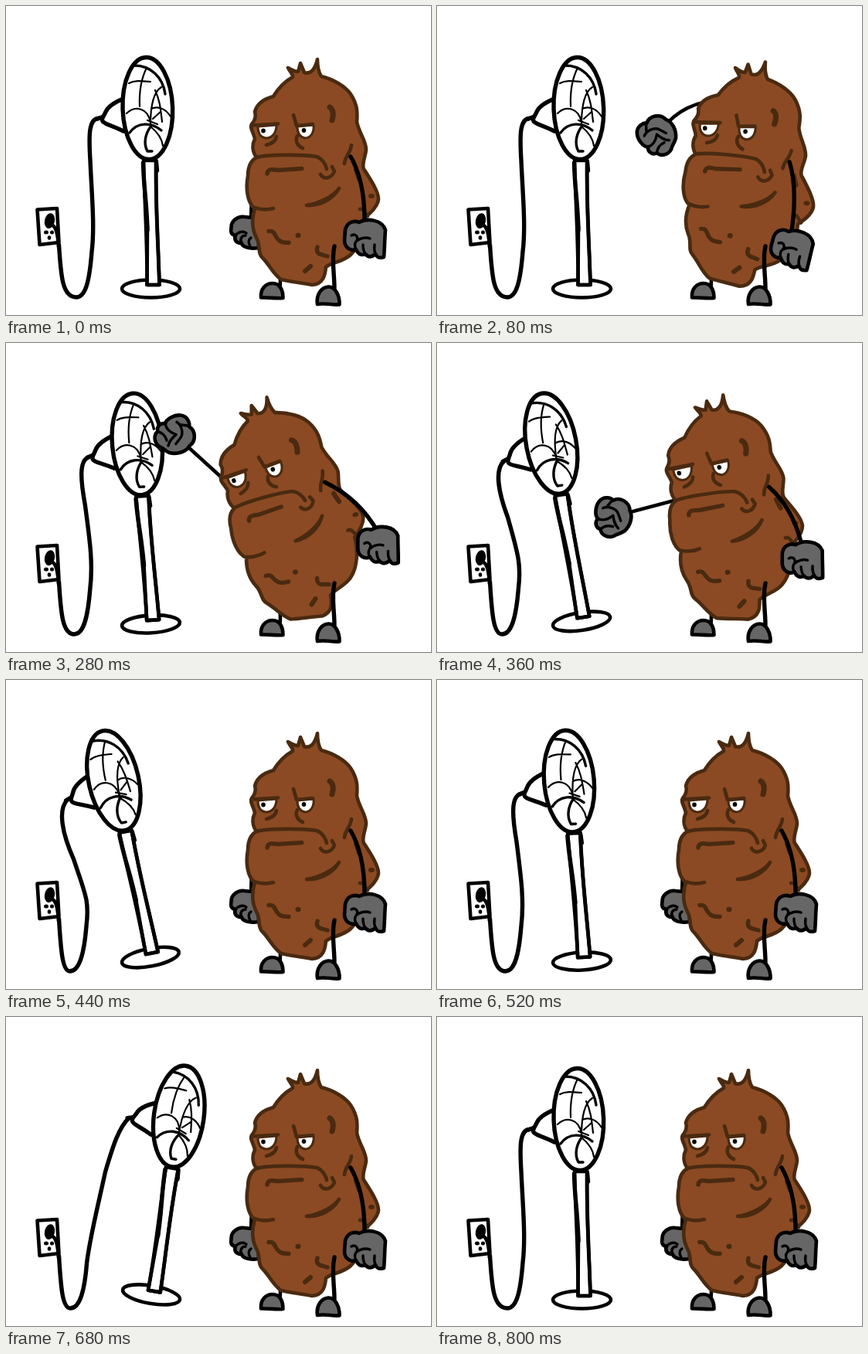
These frames come from a looping animation (550x400 px, 0.84 s). An HTML page:

```html
<!DOCTYPE html>
<html lang="en">
<head>
<meta charset="utf-8">
<title>Fan punch</title>
<style>
  html, body { margin: 0; width: 100%; height: 100%; overflow: hidden; background: #fff; }
  svg { display: block; width: 550px; height: 400px; }
  path, ellipse { fill: none; stroke: #000; stroke-width: 4.6; stroke-linecap: round; stroke-linejoin: round; }
  .white { fill: #fff; }
  .grey { fill: #666; }
  .ink { fill: #000; stroke: none; }
  .thin { stroke-width: 2.2; }
  .mid { stroke-width: 3.4; }
  .bold { stroke-width: 5.4; }
  #body path, #body ellipse { stroke: #4a2a10; }
  #body .skin { fill: #8b4a23; }
  #body .eye { fill: #fff; stroke-width: 3; }
  #body .pupil { fill: #000; stroke: none; }
  #body .spot { fill: #4a2a10; stroke: none; }
</style>
</head>
<body>
<svg viewBox="0 0 550 400">
  <g id="outlet">
    <path class="white" d="M40.500 263.500L66 262L68.500 306L43.500 309Z"/>
    <ellipse class="ink" cx="56.500" cy="278" rx="6.500" ry="10" transform="rotate(12 56 278)"/>
    <path d="M58 283C64 284 67 292 68 312"/>
    <ellipse class="ink" cx="52" cy="293" rx="3" ry="2.500"/>
    <ellipse class="ink" cx="59.500" cy="293" rx="2.500" ry="2.500"/>
    <ellipse class="ink" cx="56" cy="300" rx="2.300" ry="2.800"/>
  </g>
  <path id="cord" class="bold"/>
  <g id="fan">
    <ellipse class="white" cx="187.500" cy="366" rx="37.500" ry="11.500"/>
    <path class="white" stroke="none" d="M178 200C179 250 183 300 182.500 361L198.500 361C197 300 193 250 194.500 200Z"/>
    <path class="bold" d="M177.500 203C178 235 182 250 183 290"/>
    <path d="M183 285L182.500 361L198.500 361C197 310 193.500 270 194 203"/>
    <path class="bold" d="M194.500 202L195.500 213"/>
    <path class="white bold" d="M152 120C142 124 132 130 129 137C127 142 123 146 125 149C127 153 136 154 152 162"/>
    <path class="bold" d="M118 146L125 143.500"/>
    <ellipse class="white bold" cx="183.300" cy="132.500" rx="32.300" ry="66" transform="rotate(-2 183 132)"/>
    <path class="mid" d="M166 77C187 77 203 92 206 114"/>
    <path class="thin" d="M159 100C166 96 175 97 187 98M182 80C176 92 172 108 173 130"/>
    <path class="thin" d="M156 139C167 128 184 132 187 151"/>
    <path class="thin" d="M201 105C190 112 187 132 187 153M188 133C198 128 208 135 213 143M193 109C199 122 200 132 202 150"/>
    <path class="mid" d="M160 164C170 150 188 150 201 161M188 155C181 164 177 177 183 188L189 188"/>
    <path class="thin" d="M183 148L196 153M187 156C197 164 202 173 203 181M190 146L200 137"/>
  </g>
  <g id="restArm">
    <path d="M318 245L317 277"/>
    <path class="grey" d="M291.500 287C291 278 300 271.500 309 273L327 275L327 313C315 315 306 312 305 307C297 307 295 302 297 297C291 296 290.500 292 291.500 287Z"/>
    <path class="mid" d="M297 297C301 292 307 291 311 294M305 307C302 302 305 297 310 297M316 311C313 306 314 302 317 300"/>
  </g>
  <g id="punchArm">
    <path id="punchLine"/>
    <g id="punchFist">
      <path class="grey" d="M-24 -11C-22 -20 -12 -22 -8 -20C-2 -28 12 -27 17 -17C24 -12 26 0 22 10C18 16 14 18 12 22C6 28 -4 27 -7 21C-14 22 -18 16 -16 10C-22 8 -26 -4 -24 -11Z"/>
      <path class="mid" d="M-16 10C-8 10 -3 4 0 -2M-16 -5C-11 -11 0 -12 5 -7L12 0M-7 21C-5 15 0 12 6 11M-9 -20L-12 -9M0 -2C4 4 7 8 13 10"/>
    </g>
  </g>
  <path d="M354 342C355 352 356 358 354 366"/>
  <path class="grey" d="M330 377.500C329 366 336 359 345 359C354 359 358.500 367 358.500 378C350 379 340 377 330 377.500Z"/>
  <g id="body">
    <path class="skin" d="M365 80C370 83 374 85 378 85L381 74L386 86C394 89 400 82 403 69C403 78 404 85 408 91C424 95 439 104 446 114C455 128 455 138 454 150C457 165 466 174 466 186C465 196 460 204 463 211C472 225 482 240 482 250C481 260 472 268 464 274C465 290 457 312 446 322C437 331 420 332 414 338C413 348 411 360 396 361C382 358 368 357 356 354C345 346 341 335 332 326C325 320 330 310 324 300C319 290 317 278 322 262C312 255 310 235 313 220C313 208 317 200 324 196C319 189 318 180 322 172C321 165 315 158 318 153C322 148 324 143 322 137C325 125 335 120 346 117C352 107 362 97 371 92C372 88 367 85 365 80Z"/>
    <path class="eye" d="M326 156L350 154C350 164 345 171 336 171C329 170 326 164 326 156Z"/>
    <path class="eye" d="M377 156L398 154C399 164 394 171 387 171C381 170 377 165 377 156Z"/>
    <ellipse class="pupil" cx="333" cy="161.500" rx="2.800" ry="3"/>
    <ellipse class="pupil" cx="385.500" cy="161" rx="2.800" ry="3"/>
    <path d="M318 154.500L352 152.500M372 141L376 155L397 153M350 169C349 175 345 178 337 180M377 168C373 176 379 182 384 184"/>
    <path d="M324 196C338 192 386 192 402 195C410 198 414 206 415 211M322 261C329 264 339 264 346 262"/>
    <path class="bold" d="M338 217C339 211 343 211 352 212.500L383 210.500"/>
    <path d="M407 218C412 226 422 222 425 214L422 208"/>
    <path d="M389 258C406 259 423 250 431 236C425 245 408 255 389 258Z"/>
    <path style="stroke-width:7" d="M419 131C424 134 424 142 422 148"/>
    <path class="bold" d="M340 291.500C349 290 347 299 353 303C357 307 361 306 366 306.500M403 312C401 318 404 321 409 322L416 324"/>
    <path style="stroke-width:6" d="M387 343L394 337M453 212L457 224"/>
    <path d="M447 180C446 190 439 194 438 204M458 263C463 261 465 270 468 272"/>
    <ellipse class="spot" cx="378" cy="297" rx="3.500" ry="3.300"/>
    <ellipse class="spot" cx="473" cy="246" rx="4" ry="3"/>
  </g>
  <path class="bold" d="M425 311C421 328 425 346 425 365"/>
  <path class="grey" d="M403 386C401 374 408 364 417 363.500C426 363 432 375 431.500 386.500C422 387.500 414 384 403 386Z"/>
  <path id="armLine" class="bold"/>
  <g id="armFist">
    <path class="grey" d="M-26 -11C-24 -21 -15 -24 -8 -21C3 -27 22 -24 26 -11C25 1 25 14 24 24C17 26 15 24 13 20C8 25 3 24 0 20C-6 23 -10 19 -12 14C-20 17 -27 11 -27 2Z"/>
    <path class="mid" d="M-18 -4C-12 -7 -8 -1 -12 4C-15 8 -13 12 -12 14M-11 3C-6 -1 1 -2 6 0M-3 8C-3 13 -2 17 0 20M12 8C11 13 12 17 13 20"/>
  </g>
</svg>
<script>
  const STEP = 40, COUNT = 21, HIT = 6, REST = 11;
  const el = id => document.getElementById(id);
  const set = (id, name, value) => el(id).setAttribute(name, value);
  const show = (id, on) => { el(id).style.display = on ? "" : "none"; };

  const sway = k => (1 - Math.cos(Math.PI * k)) / 2;
  const mix = (a, b, k) => a + (b - a) * k;
  const part = (v, from, to) => Math.min(1, Math.max(0, (v - from) / (to - from)));

  // Wind up, lunge, straighten
  const lean = i => 7 * sway(part(i, 0, 3)) - 22.5 * sway(part(i, 3, 7)) + 15.5 * sway(part(i, 7, REST));

  // Knocked back, rocks forward, settles
  const tilt = i => -10.7 * Math.sin(part(i, HIT, REST) * Math.PI / 2)
    + 22.2 * sway(part(i, REST, 16)) - 11.5 * sway(part(i, 16, 20));

  // Key poses of the punch: step, fist angle, reach, bend, shoulder height
  const poses = [
    [0, 106, 130, 0, 200],
    [2, 177, 60, 20, 125],
    [5, 310, 134, -50, 125],
    [7, 200, 135, 0, 187],
    [REST, 106, 130, 0, 200]
  ];

  function poseAt(i) {
    const n = poses.findIndex(p => p[0] > i);
    const a = poses[n - 1], b = poses[n], k = sway(part(i, a[0], b[0]));
    return a.map((v, j) => mix(v, b[j], k)).slice(1);
  }

  function turn(x, y, deg, cx, cy) {
    const r = deg * Math.PI / 180, c = Math.cos(r), s = Math.sin(r);
    return [cx + (x - cx) * c - (y - cy) * s, cy + (x - cx) * s + (y - cy) * c];
  }
  const onBody = (x, y, a) => turn(x, y, a, 375, 310);

  function drawFan(a) {
    const edge = a < 0 ? 150 : 226, size = Math.abs(a);
    set("fan", "transform", `rotate(${a} ${edge} 366)`);

    // The cord hangs through two loose points to its lowest one
    const [x, y] = turn(120, 145.5, a, edge, 366);
    const hx = 109 + 2 * a, hy = 200 + 3 * Math.max(0, -a), pull = 2 - 1.2 * a;
    const kx = 111 - 0.65 * size, ky = 318, low = 91 - 0.8 * size;
    set("cord", "d", `M${x} ${y}C${x - 13} ${y + 1.2 * size} ${hx - pull} ${hy - 33} ${hx} ${hy}`
      + `C${hx + pull} ${hy + 45} ${kx + 4} ${ky - 33} ${kx} ${ky}`
      + `C${kx - 3} ${ky + 38} ${low + 12} 377 ${low} 377C73 377 71 350 68.5 309`);
  }

  function drawBody(a) {
    set("body", "transform", `rotate(${a} 375 310)`);
    const [sx, sy] = onBody(446, 195, a);
    const fx = 465 - 1.1 * a, fy = 301 + 2.5 * a, ex = fx - 1, ey = fy - 18;
    set("armLine", "d", `M${sx} ${sy}Q${(sx + ex) / 2 + 10} ${(sy + ey) / 2 - 11} ${ex} ${ey}`);
    set("armFist", "transform", `translate(${fx} ${fy}) rotate(${2 * Math.max(a, -2)})`);
  }

  function drawPunch(i, a) {
    const active = i > 0 && i < REST;
    show("restArm", !active);
    show("punchArm", active);
    if (!active) return;
    const [angle, reach, bend, height] = poseAt(i);
    const [sx, sy] = onBody(340, height, a);
    const [fx, fy] = turn(345 + reach, 165, angle, 345, 165);
    const len = Math.hypot(fx - sx, fy - sy);
    const bx = (sx + fx) / 2 - bend * (fy - sy) / len;
    const by = (sy + fy) / 2 + bend * (fx - sx) / len;
    const dir = Math.atan2(by - fy, bx - fx) * 180 / Math.PI;
    set("punchLine", "d", `M${sx} ${sy}Q${bx} ${by} ${fx} ${fy}`);
    set("punchFist", "transform", `translate(${fx} ${fy}) rotate(${dir + 40})`);
  }

  const begin = performance.now();
  function tick() {
    const i = Math.floor((performance.now() - begin) / STEP) % COUNT;
    const a = lean(i);
    drawFan(tilt(i));
    drawBody(a);
    drawPunch(i, a);
    requestAnimationFrame(tick);
  }
  tick();
</script>
</body>
</html>
```
